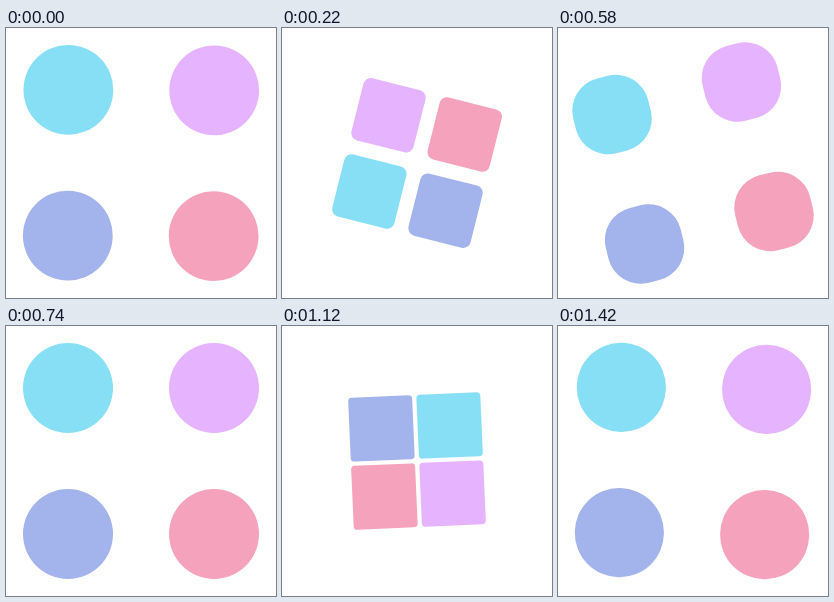
Write an HTML page with a canvas that moves like this. It is 270 px wide and 270 px high and loops after 1440 ms.

```html
<!DOCTYPE html>
<html lang="en">
<head>
<meta charset="utf-8">
<title>Four shape loader</title>
<style>
  html, body { margin: 0; height: 100%; overflow: hidden; background: #fff; }
  canvas { display: block; width: 100vw; height: 100vh; }
</style>
</head>
<body>
<canvas></canvas>
<script>
const STAGE = 270, HALF = 720, DELAY = 25;
const canvas = document.querySelector('canvas');
const ctx = canvas.getContext('2d');
const shapes = [
  { x: -1, y: -1, color: '#86dff4' },
  { x: 1, y: -1, color: '#e6b3ff' },
  { x: -1, y: 1, color: '#a3b3eb' },
  { x: 1, y: 1, color: '#f5a2bd' }
];
const mix = (a, b, p) => a + (b - a) * p;

// cubic-bezier(.25, .1, .25, 1), solved by bisection
function ease(x) {
  let lo = 0, hi = 1, u = 0.5;
  for (let i = 0; i < 24; i++) {
    u = (lo + hi) / 2;
    if (0.75 * u * (1 - u) + u ** 3 < x) lo = u; else hi = u;
  }
  return 0.3 * u * (1 - u) ** 2 + 3 * u * u * (1 - u) + u ** 3;
}

function draw(now) {
  const t = (now - DELAY + 2 * HALF) % (2 * HALF);
  const direction = t < HALF ? -1 : 1;
  const x = (t % HALF) / (HALF / 2);
  // 0 = spread circles, 1 = gathered squares
  const p = x < 1 ? ease(x) : 1 - ease(x - 1);
  const offset = mix(73, 33, p);
  const size = mix(64, 90, (1 - p) ** 4);
  const radius = size * mix(0.5, 0.047, p);

  const ratio = devicePixelRatio || 1;
  const w = Math.round(innerWidth * ratio), h = Math.round(innerHeight * ratio);
  if (canvas.width !== w || canvas.height !== h) {
    canvas.width = w;
    canvas.height = h;
  }
  ctx.setTransform(w / STAGE, 0, 0, h / STAGE, w / 2, h / 2);
  ctx.fillStyle = '#fff';
  ctx.fillRect(-STAGE / 2, -STAGE / 2, STAGE, STAGE);
  ctx.rotate(direction * p * Math.PI / 2);
  for (const s of shapes) {
    ctx.fillStyle = s.color;
    ctx.beginPath();
    ctx.roundRect(s.x * offset - size / 2, s.y * offset - size / 2, size, size, radius);
    ctx.fill();
  }
}

const start = performance.now();
function tick() {
  draw(performance.now() - start);
  requestAnimationFrame(tick);
}
tick();
</script>
</body>
</html>
```
